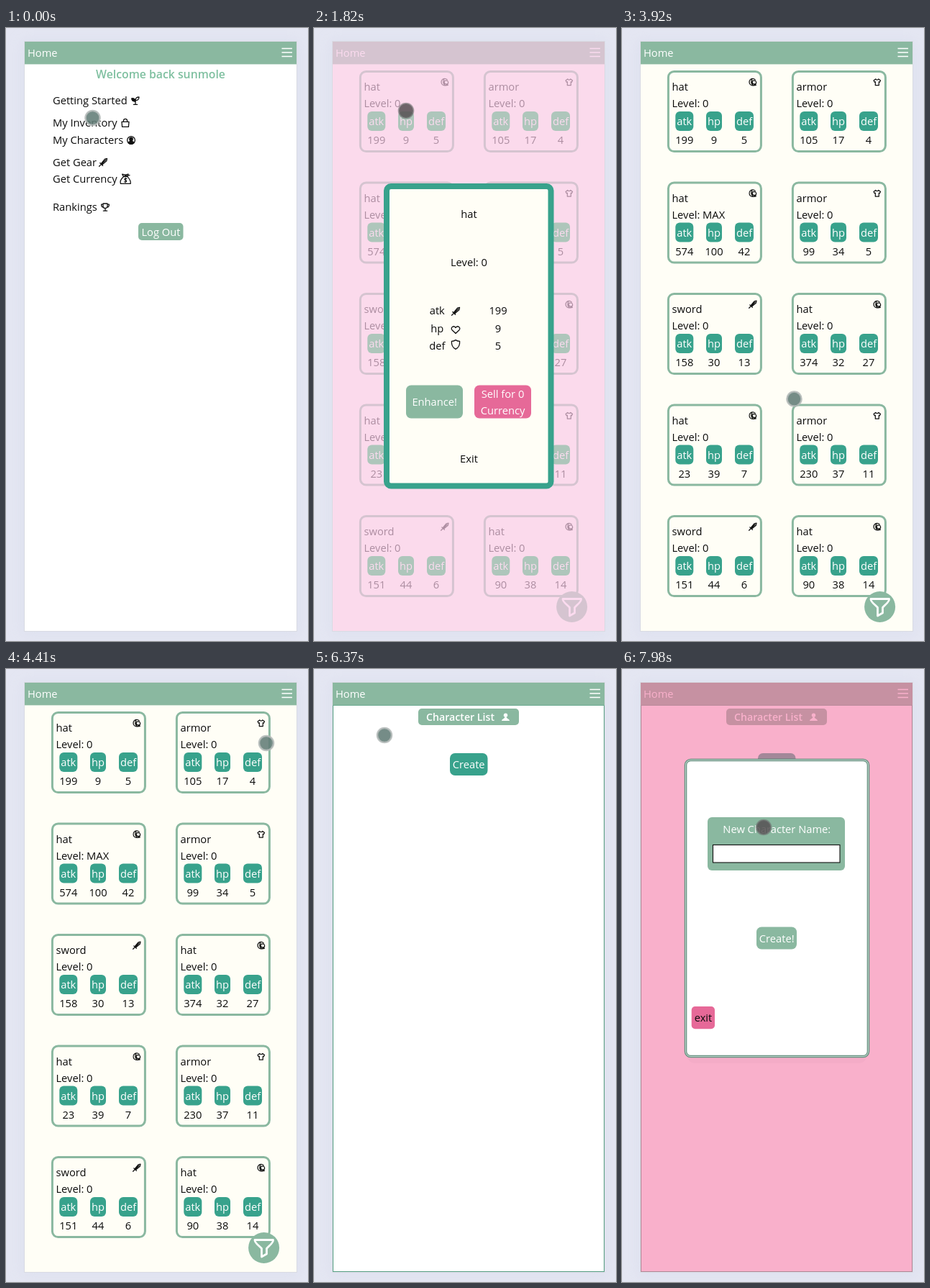
Write an HTML page that moves like this. It is 420 px wide and 852 px high and loops after 8000 ms.

```html
<!DOCTYPE html>
<html lang="en">
<head>
<meta charset="utf-8">
<title>Gear game</title>
<style>
  html, body { margin: 0; width: 100%; height: 100%; overflow: hidden; background: #e4e6f2; }
  svg { display: block; width: 420px; height: 852px; }
  text { font: 14.7px "Open Sans", "Noto Sans", sans-serif; fill: #0c0c0c; }
  .w { fill: #fff; }
  .b { font-weight: 600; }
  .m { text-anchor: middle; }
  .badge { fill: #38a28c; }
  .dimmed .badge { fill: #0fbe5e; }
  .icon { fill: none; stroke: #111; stroke-width: 1.3; stroke-linecap: round; stroke-linejoin: round; }
</style>
</head>
<body>
<svg id="stage" viewBox="0 0 420 852" xmlns="http://www.w3.org/2000/svg"></svg>
<script>
const LOOP = 8000;
const GREEN = '#8ab8a0', TEAL = '#38a28c', PINK = '#e66998', IVORY = '#fffef6';

const rect = (x, y, w, h, fill, rx = 0, extra = '') =>
  `<rect x="${x}" y="${y}" width="${w}" height="${h}" rx="${rx}" fill="${fill}" ${extra}/>`;
const text = (x, y, s, cls = '', extra = '') => `<text x="${x}" y="${y}" class="${cls}" ${extra}>${s}</text>`;
const mid = (x, y, s, cls = '') => text(x, y, s, 'm ' + cls);
const group = (id, body) => `<g id="${id}">${body}</g>`;

// Icons are drawn around their own centre
const ICONS = {
  sword: '<path d="M5.5-5.5L4.8-2.2-1.6 3.2-3 1.8 2.5-4.8zM-4.3.6L-.4 4.2M-2.8 2.6L-5.4 5.2M3.5-3.5L-2 2"/>',
  hat: '<path d="M4.6 1.8A5 5 0 1 1 3.6-3.6M-1-4.6C-3-1-2 2 .2 4.6M0-2.2H3.6C5.4-1.4 5.4 1 4.4 2.8L.6 2.6C-.8 1-1-.6 0-2.2M1.4 4.8L4.8 4.2"/>',
  armor: '<path d="M-2.2-4.6C-1.2-3 1.2-3 2.2-4.6L5-2.4 3.8 0 2.6-.6V4.6H-2.6V-.6L-3.8 0-5-2.4z"/>',
  heart: '<path d="M0 5L-5 .2C-7.6-3-3-6.8 0-3 3-6.8 7.6-3 5 .2z"/>',
  shield: '<path d="M0-6.4C2-5 3.6-4.6 5.6-4.6 6 .6 4 4.4 0 6.4-4 4.4-6 .6-5.6-4.6-3.6-4.6-2-5 0-6.4z"/>',
  sprout: '<path d="M0 5.4V-.6M-2.6 5.4H2.6M0 1C-3.6 1-5-.6-5-3-2-3.2 0-2 0 1M0-.4C0-3.6 2-5 5-5 5-2 3.4-.4 0-.4"/>' +
    '<path d="M0 1C-3.6 1-5-.6-5-3-2-3.2 0-2 0 1" fill="#111"/>',
  bag: '<path d="M-5-1.6H5L4.4 5.4H-4.4zM-2.6-1.6V-3C-2.4-6.4 2.4-6.4 2.6-3V-1.6"/>',
  user: '<circle r="5.4"/><circle cy="-1.6" r="2.2" fill="#111"/><path d="M-4 3.6C-3 .8 3 .8 4 3.6 2 5.8-2 5.8-4 3.6" fill="#111"/>',
  money: '<path d="M-2.4-3.4H3C6 0 8 3 7.2 6.4H-6.6C-8 3-5.4-.6-2.4-3.4L-4.4-6.8 0-5.8 4-7 3-3.4M-1-4.6L6-5.4"/>' +
    '<path d="M2-.6C-1.6-1.6-2 1.4.2 1.6 2.8 2 1.8 4.6-1.6 3.8M.2-1.6V5" stroke-width="1.1"/>',
  trophy: '<path d="M-3-5H3V-1.6C3 2.4-3 2.4-3-1.6zM-3-3.8H-5.4C-5.4-1-4.4 0-2.8.2M3-3.8H5.4C5.4-1 4.4 0 2.8.2M0 1.6V4.6M-2.6 5.2H2.6"/>'
};
const icon = (name, x, y, k = 1) => `<g class="icon" transform="translate(${x} ${y}) scale(${k})">${ICONS[name]}</g>`;

function homePage() {
  const rows = [
    ['Getting Started', 106, 'sprout', 180], ['My Inventory', 137, 'bag', 166],
    ['My Characters', 161, 'user', 174], ['Get Gear', 192, 'sword', 135],
    ['Get Currency', 215, 'money', 166], ['Rankings', 254, 'trophy', 138]
  ];
  return mid(215, 70, 'Welcome back sunmole', 'b').replace('<text', '<text style="fill:#7fc0a0;font-size:15.8px"') +
    rows.map(([s, y, name, x]) => text(65, y, s) + icon(name, x, y - 5)).join('') +
    rect(184, 271, 62.5, 24, GREEN, 5) + mid(215.5, 289, 'Log Out', 'w');
}

function card([name, level, ...stats], i) {
  const dx = i % 2 * 173, dy = (i >> 1) * 154.5;
  const badges = [['atk', 86.8, 25], ['hp', 128, 22], ['def', 170, 26]];
  return `<g transform="translate(${dx} ${dy})">` +
    rect(64.4, 60.4, 129, 111.2, 'none', 8, `stroke="${GREEN}" stroke-width="3"`) +
    text(69.5, 87, name) + text(69.5, 110, 'Level: ' + level) + icon(name, 181.8, 75.3, .95) +
    badges.map(([s, x, w], n) =>
      `<rect class="badge" x="${x - w / 2}" y="116" width="${w}" height="27" rx="6"/>` +
      mid(x, 135, s, 'w') + mid(x, 161, stats[n])).join('') + '</g>';
}

function inventoryPage() {
  const gear = [
    ['hat', 0, 199, 9, 5], ['armor', 0, 105, 17, 4],
    ['hat', 'MAX', 574, 100, 42], ['armor', 0, 99, 34, 5],
    ['sword', 0, 158, 30, 13], ['hat', 0, 374, 32, 27],
    ['hat', 0, 23, 39, 7], ['armor', 0, 230, 37, 11],
    ['sword', 0, 151, 44, 6], ['hat', 0, 90, 38, 14]
  ];
  return rect(26, 50, 378, 788, IVORY) + gear.map(card).join('') +
    `<circle cx="358.6" cy="804.5" r="21.5" fill="${GREEN}"/>` +
    '<path d="M346 793.5H371.5C372.5 797 366 801.5 362.5 805.5V813L355.5 817V805.5C352 801.5 345 797 346 793.5z" fill="none" stroke="#fff" stroke-width="2.8" stroke-linejoin="round"/>';
}

function charactersPage() {
  return rect(26.5, 50.5, 377, 787, '#fff', 0, 'stroke="#56a085" stroke-width="1"') +
    rect(145, 55, 140, 23, GREEN, 5) +
    text(156, 72, 'Character List', 'w b', 'style="font-size:14.2px"') +
    '<circle cx="266.5" cy="64.2" r="2.7" fill="#fff"/><path d="M261 72C261.5 69 265 69 265.3 67H267.7C268 69 271.5 69 272 72z" fill="#fff"/>' +
    rect(189, 117, 52.5, 31, TEAL, 7) + mid(215.2, 138, 'Create', 'w');
}

function header() {
  return rect(26, 19, 378, 31.4, GREEN) + text(30, 40, 'Home', 'w') +
    '<path d="M383.5 28.5H398M383.5 34H398M383.5 39.5H398" stroke="#fff" stroke-width="1.6"/>';
}

function menu() {
  const items = ['Inventory', 'Characters', 'Get Currency', 'Get Gear!', 'Rankings', 'Getting Started'];
  return rect(26, 50, 378, 195, GREEN) + items.map((s, i) => text(30, 68 + i * 31, s, 'w')).join('');
}

function gearDialog() {
  const stats = [['atk', 398, 'sword', 394, 199], ['hp', 423, 'heart', 419.5, 9], ['def', 446.5, 'shield', 440, 5]];
  return rect(26, 19, 378, 819, '#f9cae8', 0, 'opacity=".68"') +
    rect(101, 220, 228.5, 416.5, IVORY, 6, `stroke="${TEAL}" stroke-width="8"`) +
    mid(215.5, 263.5, 'hat') + mid(215.5, 331, 'Level: 0') +
    stats.map(([s, y, name, iy, v]) => mid(171.3, y, s) + icon(name, 197, iy) + mid(256, y, v)).join('') +
    rect(128, 496.5, 79, 46, GREEN, 7) + mid(167.7, 525, 'Enhance!', 'w') +
    rect(223, 496.5, 79, 46, PINK, 7) + mid(262.5, 514, 'Sell for 0', 'w') + mid(262.5, 537, 'Currency', 'w') +
    mid(215.5, 604, 'Exit');
}

function createDialog() {
  return rect(26, 19, 378, 819, '#f574a4', 0, 'opacity=".57"') +
    rect(91, 130, 249, 418, '#a06080', 10, 'opacity=".06"') +
    rect(88.5, 126.5, 254, 412, '#fff', 7, 'stroke="#64907f" stroke-width="3.6"') +
    rect(88.5, 126.5, 254, 412, 'none', 7, 'stroke="#c4d8cf" stroke-width="1.1"') +
    rect(119, 206, 191, 74, GREEN, 6) + mid(215.3, 228, 'New Character Name:', 'w') +
    rect(126.5, 244.5, 176.5, 24.5, '#fff', 0, 'stroke="#111" stroke-width="1.1"') +
    rect(187, 358.5, 56, 31, GREEN, 7) + mid(215.2, 380, 'Create!', 'w') +
    rect(96.7, 469, 32.3, 31.2, PINK, 5) + mid(113, 490, 'exit');
}

const stage = document.getElementById('stage');
stage.innerHTML =
  '<defs><filter id="soft" x="-20%" y="-10%" width="140%" height="120%"><feGaussianBlur stdDeviation="9"/></filter></defs>' +
  rect(0, 0, 420, 852, '#e4e6f2') +
  rect(22, 17, 386, 827, '#d9dded', 0, 'filter="url(#soft)" opacity=".6"') +
  rect(25.5, 18.5, 379, 820, '#fff', 0, 'stroke="#d9dbe3"') +
  group('home', homePage()) + group('inventory', inventoryPage()) + group('characters', charactersPage()) +
  header() + group('menu', menu()) + group('gear', gearDialog()) + group('create', createDialog()) +
  '<circle id="cursor" r="10" stroke-width="2.6"/>';

const el = {};
for (const id of ['home', 'inventory', 'characters', 'menu', 'gear', 'create', 'cursor']) el[id] = document.getElementById(id);

// time, x, y
const PATH = [
  [0, 120.5, 125], [420, 120.5, 125], [1050, 128, 115], [1900, 128, 115], [2800, 157, 531],
  [3220, 157, 531], [3540, 215, 598], [3750, 215, 598], [4410, 362, 103], [4640, 390, 36],
  [4860, 390, 36], [5340, 95, 90], [6020, 95, 90], [6200, 98, 92], [6400, 98, 92],
  [6780, 215, 132], [7210, 215, 132], [7900, 197, 220], [LOOP, 197, 220]
];

function cursorAt(t) {
  const i = PATH.findIndex(p => p[0] > t);
  const [t0, x0, y0] = PATH[i - 1], [t1, x1, y1] = PATH[i];
  const u = (t - t0) / (t1 - t0), k = u * u * (3 - 2 * u);
  return [x0 + (x1 - x0) * k, y0 + (y1 - y0) * k];
}

const show = (node, on) => node.setAttribute('display', on ? 'inline' : 'none');
const within = (t, a, b) => t >= a && t < b;

function render(t) {
  const gear = within(t, 1750, 3710), open = within(t, 4800, 6020), create = t >= 6930;
  show(el.home, t < 350);
  show(el.inventory, within(t, 350, 6020));
  show(el.characters, t >= 6020);
  show(el.menu, open);
  show(el.gear, gear);
  show(el.create, create);
  el.inventory.setAttribute('class', gear ? 'dimmed' : '');
  el.create.setAttribute('opacity', Math.max(0, Math.min(1, (t - 6860) / 210)));

  const dark = gear || open || create;
  const [x, y] = cursorAt(t);
  el.cursor.setAttribute('cx', x);
  el.cursor.setAttribute('cy', y);
  el.cursor.setAttribute('fill', dark ? 'rgba(86,80,83,.86)' : 'rgba(98,124,118,.88)');
  el.cursor.setAttribute('stroke', dark ? 'rgba(110,112,112,.6)' : 'rgba(180,186,184,.85)');
}

const start = performance.now();
function tick() {
  render((performance.now() - start) % LOOP);
  requestAnimationFrame(tick);
}
tick();
</script>
</body>
</html>
```
